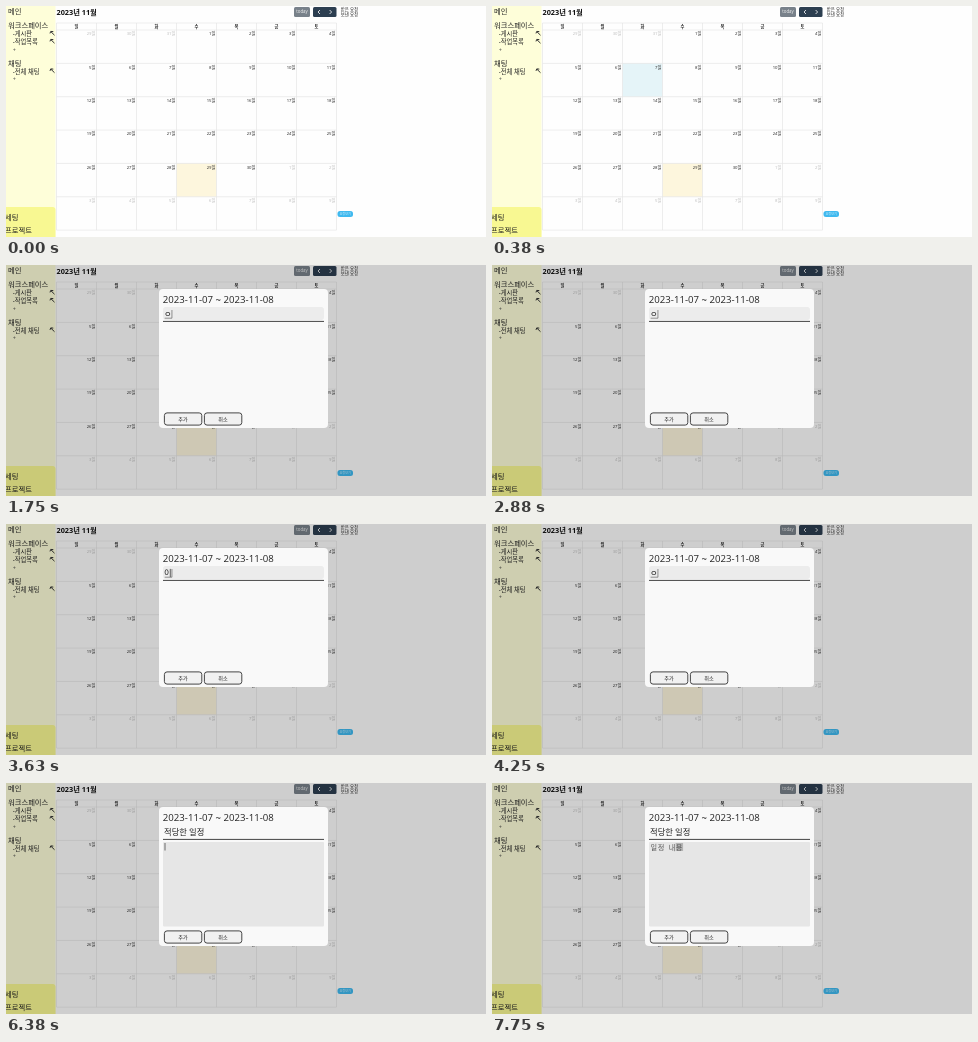
These frames come from a looping animation (480x231 px, 8 s). An HTML page:

```html
<!DOCTYPE html>
<html lang="ko">
<head>
<meta charset="utf-8">
<title>일정 추가</title>
<style>
  html, body { margin: 0; width: 480px; height: 231px; overflow: hidden; background: #fefefe; }
  svg { display: block; }
  text { font-family: 'Open Sans', 'Noto Sans CJK KR', 'Noto Sans CJK', sans-serif; white-space: pre; }
</style>
</head>
<body>
<svg id="stage" width="480" height="231" viewBox="0 0 480 231"></svg>
<script>
const LOOP = 8000;
const stage = document.getElementById('stage');

function add(parent, tag, attrs, content) {
  const el = document.createElementNS('http://www.w3.org/2000/svg', tag);
  for (const key in attrs) el.setAttribute(key, attrs[key]);
  if (content) el.textContent = content;
  parent.appendChild(el);
  return el;
}
const group = parent => add(parent, 'g', {});
const rect = (parent, x, y, width, height, fill, rx = 0, more = {}) =>
  add(parent, 'rect', { x, y, width, height, fill, rx, ...more });
const text = (parent, x, y, size, content, fill = '#222', more = {}) =>
  add(parent, 'text', { x, y, 'font-size': size, fill, ...more }, content);
const path = (parent, d, stroke, width) =>
  add(parent, 'path', { d, stroke, 'stroke-width': width, fill: 'none' });
const show = (el, on) => el.setAttribute('visibility', on ? 'visible' : 'hidden');

const MIDDLE = { 'text-anchor': 'middle' };
const END = { 'text-anchor': 'end' };

// Sidebar
function drawSidebar() {
  rect(stage, 0, 0, 49.5, 231, '#fefed9');
  path(stage, 'M0 231V201H46.5Q49.5 201 49.5 204V231Z', 'none', 0).setAttribute('fill', '#f8f892');
  const heads = [['메인', 2, 8.2], ['워크스페이스', 2, 22.2], ['채팅', 2, 59.6],
                 ['세팅', -1, 213.6], ['프로젝트', -1, 226.6]];
  for (const [label, x, y] of heads) text(stage, x, y, 7.3, label);
  const items = [['-게시판', 30], ['-작업목록', 38], ['-전체 채팅', 67.5]];
  for (const [label, y] of items) {
    text(stage, 6.8, y, 6.25, label);
    path(stage, `M44 ${y - 2.6}l.7 -2l2.6 .2M45 ${y - 4.2}l3.5 3.4`, '#333', 1);
  }
  for (const y of [45.6, 75]) text(stage, 6.8, y, 5.6, '+', '#444');
}

// Calendar
const LEFT = 50.5, TOP = 24, COL = 40, ROW = 33.35;
let picked;

function drawCalendar() {
  text(stage, 50.5, 9.4, 7.3, '2023년 11월', '#111', { 'font-weight': 700 });
  rect(stage, 288, 1, 16, 10, '#78818a', 1.5);
  text(stage, 296, 7.4, 4.4, 'today', '#f4f4f4', MIDDLE);
  rect(stage, 307, 1, 23.5, 10, '#2c3e50', 1.5);
  path(stage, 'M314 4l-2 2l2 2M323.6 4l2 2l-2 2', '#fff', 0.8);

  rect(stage, LEFT + COL * 3, TOP + ROW * 4, COL, ROW, '#fdf6dd');
  picked = rect(stage, LEFT + COL * 2, TOP + ROW, COL, ROW, '#e5f4f8');

  let lines = `M${LEFT} 17H${LEFT + COL * 7}`;
  for (let r = 0; r <= 6; r++) lines += `M${LEFT} ${TOP + ROW * r}h${COL * 7}`;
  for (let c = 0; c <= 7; c++) lines += `M${LEFT + COL * c} 17V${TOP + ROW * 6}`;
  path(stage, lines, '#e6e6e6', 0.7);

  [...'일월화수목금토'].forEach((name, c) =>
    text(stage, LEFT + COL * (c + 0.5), 22.2, 4.2, name, '#222', { ...MIDDLE, 'font-weight': 700 }));

  for (let i = 0; i < 42; i++) {
    const date = new Date(2023, 9, 29 + i);
    const x = LEFT + COL * (i % 7 + 1) - 1.2;
    const y = TOP + ROW * Math.floor(i / 7) + 5.4;
    text(stage, x, y, 4.2, date.getDate() + '일', date.getMonth() === 10 ? '#222' : '#bcbcbc', END);
  }
}

function drawRequests() {
  text(stage, 334.8, 5.2, 4.4, '받은 요청');
  text(stage, 334.8, 10.3, 4.4, '보낸 요청');
  rect(stage, 331.5, 205, 15.5, 6, '#3fb9ef', 2.5);
  text(stage, 339.2, 209.2, 3.1, '요청보기', '#d3effc', MIDDLE);
}

// Dialog
let dialog, titleBox, titleText, hint, titleMark, memoBox, memoText, memoMark, memoCaret;

function drawDialog() {
  dialog = group(stage);
  rect(dialog, 0, 0, 480, 231, '#000', 0, { 'fill-opacity': 0.19 });
  rect(dialog, 153, 24, 169, 139, '#f9f9f9', 4);
  text(dialog, 156.8, 38, 9.63, '2023-11-07 ~ 2023-11-08');
  titleBox = rect(dialog, 157, 42, 161, 13, '#ececec', 3);
  path(dialog, 'M157 56.4H318', '#444', 1);
  hint = text(dialog, 158, 51.6, 8.3, '제목을 입력하세요', '#757575');
  titleText = text(dialog, 158, 51.6, 8.3, '');
  titleMark = path(dialog, '', '#666', 0.7);
  memoBox = rect(dialog, 157, 59, 161, 84.5, '#e6e6e6', 1);
  memoMark = rect(dialog, 158.5, 60, 7.4, 8, '#b4b4b4');
  memoText = text(dialog, 158.6, 66.6, 7.2, '', '#555', { 'letter-spacing': 0.55, 'word-spacing': 1.3 });
  memoCaret = path(dialog, 'M159 60V67.5', '#333', 0.7);
  [['추가', 158], ['취소', 198]].forEach(([label, x]) => {
    rect(dialog, x + 0.4, 147.9, 37.4, 12.2, '#f1f1f1', 2.6, { stroke: '#333', 'stroke-width': 0.9 });
    text(dialog, x + 19, 155.9, 5.1, label, '#222', MIDDLE);
  });
}

// Typed states: [start, content]
const TITLE = [
  [0, ''], [1750, 'ㅇ'], [1880, '이'], [2380, ''], [2880, 'ㅇ'], [3130, ''],
  [3500, 'ㅇ'], [3630, '이'], [3880, 'ㅇ'], [4000, ''], [4250, 'ㅇ'], [4380, ''],
  [4500, '저'], [4630, '적'], [4750, '적다'], [4880, '적당'], [5000, '적당하'],
  [5130, '적당한 ㅇ'], [5250, '적당한 이'], [5380, '적당한 일'], [5500, '적당한 일저'], [5630, '적당한 일정']
];
const MEMO = [
  [0, ''], [6630, 'ㅇ'], [6880, '이'], [7130, '일'], [7250, '일저'], [7380, '일정'],
  [7500, '일정 ㄴ'], [7630, '일정 내'], [7750, '일정 내용']
];
const PICK = 380, OPEN = 500, FOCUS_TITLE = 1250, FOCUS_MEMO = 6250, CARET = 6380;

const stateAt = (steps, t) => steps.filter(s => s[0] <= t).pop()[1];
const setText = (el, value) => { if (el.textContent !== value) el.textContent = value; };

function render(t) {
  const title = stateAt(TITLE, t), memo = stateAt(MEMO, t);
  const inMemo = t >= FOCUS_MEMO;
  const inTitle = t >= FOCUS_TITLE && !inMemo;

  show(picked, t >= PICK && t < FOCUS_TITLE);
  dialog.setAttribute('display', t >= OPEN ? 'inline' : 'none');
  if (t < OPEN) return;

  show(titleBox, inTitle);
  show(hint, !title);
  setText(titleText, title);
  show(titleMark, inTitle && title);
  if (title) {
    const end = 158 + titleText.getComputedTextLength();
    titleMark.setAttribute('d', `M${end - 7} 53.2H${end + 0.3}V45`);
  }

  show(memoBox, inMemo);
  setText(memoText, memo);
  show(memoMark, memo);
  show(memoCaret, t >= CARET && !memo);
  if (memo) memoMark.setAttribute('x', 158.5 + memoText.getComputedTextLength() - 7.2);
}

drawSidebar();
drawCalendar();
drawRequests();
drawDialog();

const start = performance.now();
function tick() {
  render((performance.now() - start) % LOOP);
  requestAnimationFrame(tick);
}
tick();
</script>
</body>
</html>
```
